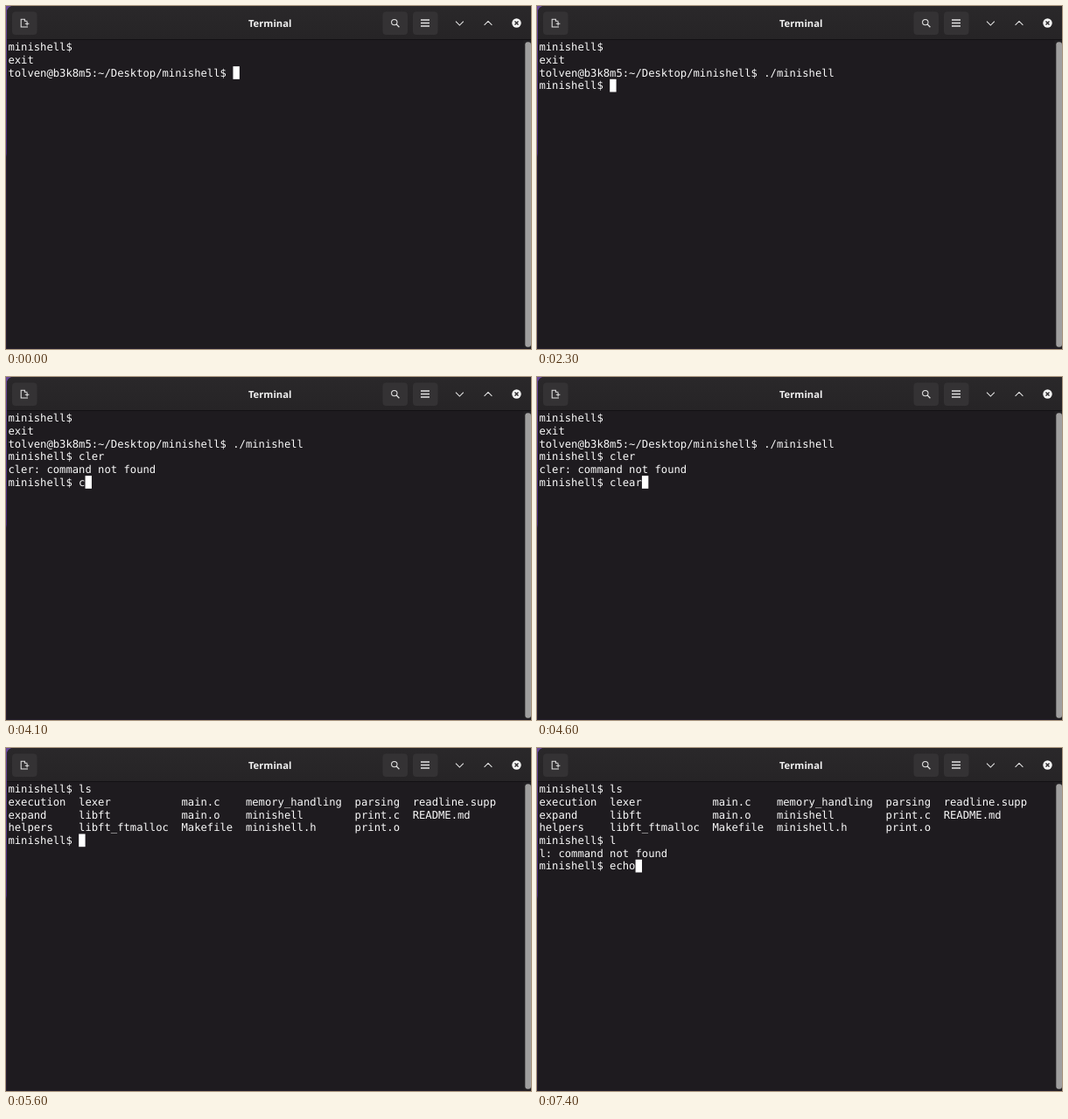
An HTML page that plays this animation: 600x393 px, repeating every 8 s.

```html
<!DOCTYPE html>
<html lang="en">
<head>
<meta charset="utf-8">
<title>Terminal</title>
<style>
  html, body { margin: 0; width: 100%; height: 100%; overflow: hidden; background: #1e1b1f; }
  svg { display: block; width: 100vw; height: 100vh; }
  text { text-rendering: geometricPrecision; }
  .title { font: bold 11.25px "Noto Sans", "Open Sans", sans-serif; fill: #f0f0f0; text-anchor: middle; }
  .row { font: 12.2px "DejaVu Sans Mono", monospace; fill: #fafafa; white-space: pre; }
  .icon { fill: none; stroke: #e4e4e4; stroke-width: 1.05; }
  .button { fill: #343234; }
</style>
</head>
<body>
<svg viewBox="0 0 600 393" preserveAspectRatio="none">
  <defs>
    <linearGradient id="bar" x2="0" y2="1">
      <stop offset="0" stop-color="#2a282a"/>
      <stop offset="1" stop-color="#262426"/>
    </linearGradient>
    <linearGradient id="desk" x2="0" y2="1">
      <stop offset="0" stop-color="#6a4a9c"/>
      <stop offset=".43" stop-color="#45297a"/>
      <stop offset=".44" stop-color="#2c2040"/>
      <stop offset="1" stop-color="#2a2036"/>
    </linearGradient>
  </defs>
  <rect width="600" height="393" fill="url(#desk)"/>
  <path d="M1 392.5V8Q1 0 9 0H600V392.5Z" fill="#1e1b1f"/>
  <path d="M1 38V8Q1 0 9 0H600V38Z" fill="url(#bar)"/>
  <path d="M1 38.5H600" stroke="#121013"/>

  <g class="button">
    <rect x="7" y="6.5" width="28.5" height="26.5" rx="4"/>
    <rect x="430.5" y="6.5" width="28.5" height="26.5" rx="4"/>
    <rect x="465" y="6.5" width="28.5" height="26.5" rx="4"/>
  </g>
  <g class="icon">
    <path d="M25 24H17.2V15.3H21.4V17.3H24.4M21.8 20.3H26.4M24.1 18V22.6"/>
    <circle cx="443.8" cy="18.6" r="3.2"/>
    <path d="M446.1 20.9L449.4 24.2" stroke-width="1.3"/>
    <path d="M474 16H484M474 19.5H484M474 23H484" stroke-width="1.6"/>
    <path d="M514 17.6L518.4 22L522.8 17.6M546.6 21.8L551 17.4L555.4 21.8"/>
  </g>
  <circle cx="583.5" cy="19.5" r="5.2" fill="#f6f6f6"/>
  <path d="M581.5 17.5L585.5 21.5M585.5 17.5L581.5 21.5" stroke="#2a282a" stroke-width="1.4"/>
  <text class="title" x="301.7" y="23.8">Terminal</text>

  <rect x="591.5" y="39" width="8.5" height="353.5" fill="#222023"/>
  <rect x="593.3" y="41.3" width="6.7" height="349.5" rx="3" fill="#a09f9f"/>

  <g id="rows"></g>
  <rect id="cursor" width="7.4" height="14.7" fill="#fff"/>
</svg>
<script>
const LOOP = 8000, LEFT = 2.4, TOP = 40, CHAR = 7.345, LINE = 14.67;
const PROMPT = "minishell$ ";
const START = PROMPT + "\nexit\ntolven@b3k8m5:~/Desktop/minishell$ ";
const LISTING = [
  "execution  lexer           main.c    memory_handling  parsing  readline.supp",
  "expand     libft           main.o    minishell        print.c  README.md",
  "helpers    libft_ftmalloc  Makefile  minishell.h      print.o"
].join("\n");
const missing = name => `\n${name}: command not found\n${PROMPT}`;
const CLEAR = "\f";

// [time, appended output]
const events = [
  [1300, "."], [1400, "/"], [1600, "m"], [1700, "i"], [1900, "nishell "],
  [2300, "\n" + PROMPT],
  [2800, "c"], [3200, "l"], [3400, "e"], [3500, "r"], [3600, missing("cler")],
  [4000, "c"], [4400, "l"], [4500, "e"], [4600, "ar"], [4800, CLEAR + PROMPT],
  [5200, "l"], [5400, "s"], [5600, `\n${LISTING}\n${PROMPT}`],
  [6300, "l"], [6600, missing("l")],
  [6900, "e"], [7100, "c"], [7300, "h"], [7400, "o"]
];

const cursor = document.getElementById("cursor");
const rows = Array.from({ length: 7 }, (_, i) => {
  const row = document.createElementNS("http://www.w3.org/2000/svg", "text");
  row.setAttribute("class", "row");
  row.setAttribute("x", LEFT);
  row.setAttribute("y", TOP + i * LINE + 11.4);
  return document.getElementById("rows").appendChild(row);
});

function screenAt(t) {
  const output = events.filter(([time]) => time <= t).map(e => e[1]).join("");
  return (START + output).split(CLEAR).pop().split("\n");
}

let shown = "";
function draw(t) {
  const lines = screenAt(t), last = lines.length - 1;
  const key = lines.join("\n");
  if (key !== shown) {
    rows.forEach((row, i) => row.textContent = lines[i] || "");
    cursor.setAttribute("x", LEFT + lines[last].length * CHAR);
    cursor.setAttribute("y", TOP + last * LINE - 0.2);
    shown = key;
  }
  cursor.setAttribute("visibility", t >= 600 && t < 1200 ? "hidden" : "visible");
}

const began = performance.now();
function tick() {
  draw((performance.now() - began) % LOOP);
  requestAnimationFrame(tick);
}
tick();
</script>
</body>
</html>
```
